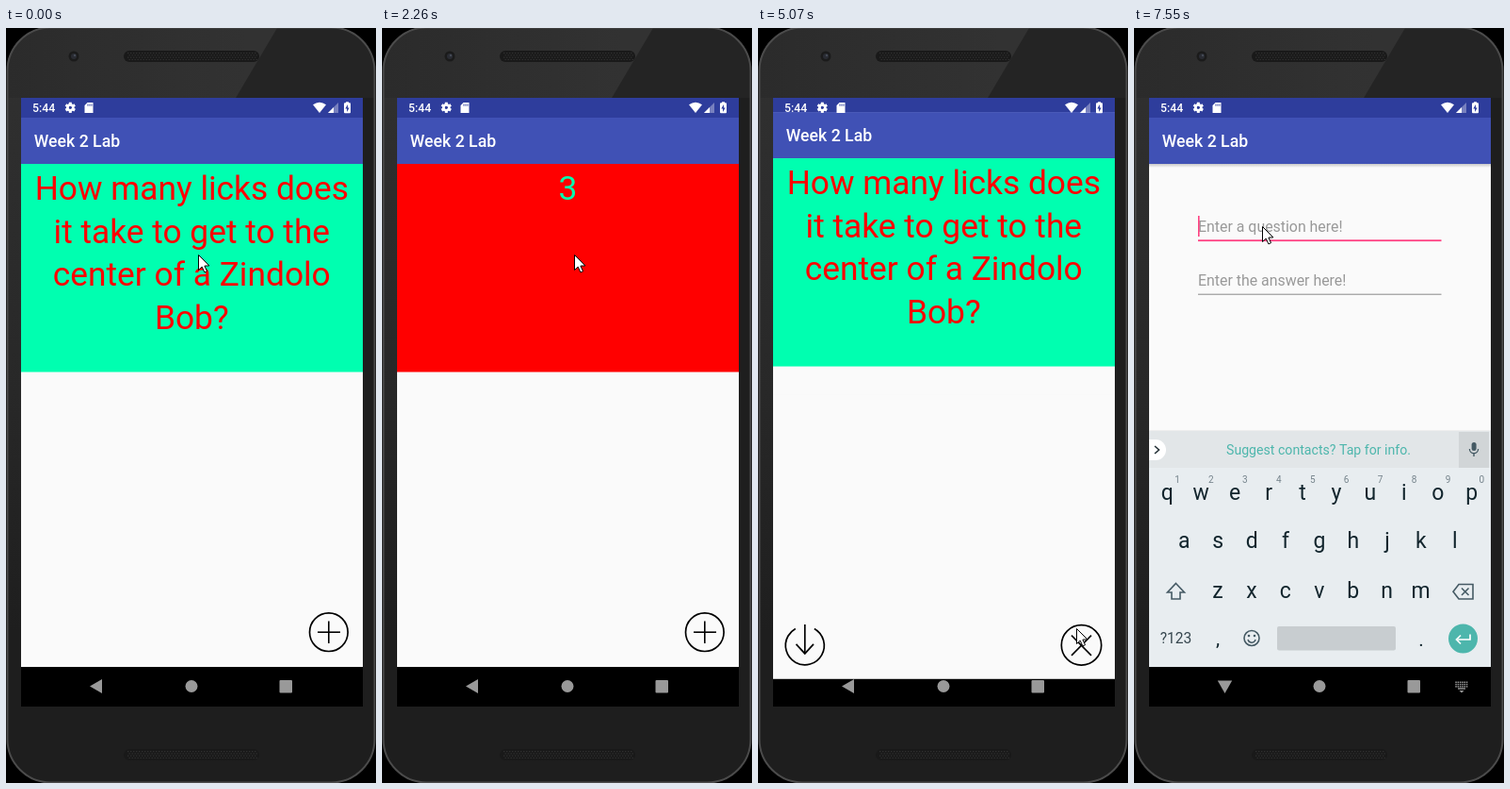
Write an HTML page with a canvas that moves like this. It is 393 by 800 pixels and loops after 8 s.

```html
<!DOCTYPE html>
<html lang="en">
<head>
<meta charset="utf-8">
<title>Flashcard app</title>
<style>
  html, body { margin: 0; width: 100%; height: 100%; overflow: hidden; background: #000; }
  canvas { display: block; width: 393px; height: 800px; }
</style>
</head>
<body>
<canvas id="stage"></canvas>
<script>
const W = 393, H = 800, LOOP = 8000;
const MINT = '#00ffb0', RED = '#ff0000', PAGE = '#fafafa', TEAL = '#4db6ac', PINK = '#ff4081';
const dpr = window.devicePixelRatio || 1;

function layer(canvas) {
  canvas.width = W * dpr;
  canvas.height = H * dpr;
  const ctx = canvas.getContext('2d');
  ctx.scale(dpr, dpr);
  return ctx;
}

const stage = layer(document.getElementById('stage'));
const phone = layer(document.createElement('canvas'));
const keys = layer(document.createElement('canvas'));
let g = stage;

// Drawing helpers
function rect(x, y, w, h, color) {
  g.fillStyle = color;
  g.fillRect(x, y, w, h);
}
function round(x, y, w, h, r, color) {
  g.fillStyle = color;
  g.beginPath();
  g.roundRect(x, y, w, h, r);
  g.fill();
}
function disc(x, y, r, color) {
  g.fillStyle = color;
  g.beginPath();
  g.arc(x, y, r, 0, Math.PI * 2);
  g.fill();
}
function ring(x, y, r, color, width, from = 0, to = Math.PI * 2) {
  g.strokeStyle = color;
  g.lineWidth = width;
  g.beginPath();
  g.arc(x, y, r, from, to);
  g.stroke();
}
function trace(points) {
  g.beginPath();
  for (let i = 0; i < points.length; i += 2) g.lineTo(points[i], points[i + 1]);
}
function poly(points, color) {
  trace(points);
  g.fillStyle = color;
  g.fill();
}
function line(points, color, width, closed) {
  trace(points);
  if (closed) g.closePath();
  g.strokeStyle = color;
  g.lineWidth = width;
  g.stroke();
}
function text(str, x, y, size, color, align = 'left', weight = 400) {
  g.font = `${weight} ${size}px Roboto, sans-serif`;
  g.textAlign = align;
  g.fillStyle = color;
  g.fillText(str, x, y);
}

// Timing helpers
const clamp = v => Math.min(1, Math.max(0, v));
const span = (t, a, b) => clamp((t - a) / (b - a));
const mix = (a, b, k) => a + (b - a) * k;
const smooth = k => k * k * (3 - 2 * k);
const easeOut = k => 1 - (1 - k) ** 2;

// cubic-bezier(0.2, 0, 0, 1)
function swift(x) {
  let lo = 0, hi = 1;
  for (let i = 0; i < 24; i++) {
    const s = (lo + hi) / 2;
    if (0.6 * s * (1 - s) ** 2 + s ** 3 < x) lo = s; else hi = s;
  }
  return lo * lo * (3 - 2 * lo);
}

function speaker(y) {
  round(125, y, 144, 12, 6, '#191919');
  for (let row = 0; row < 4; row++)
    for (let x = 129 + (row % 2) * 1.5; x < 266; x += 3)
      rect(x, y + 2 + row * 2.3, 1.4, 1.2, '#303030');
}

function drawPhone() {
  rect(0, 0, W, H, '#000');
  g.save();
  g.beginPath();
  g.roundRect(1, -1, 391, 801, 46);
  g.clip();
  rect(0, 0, W, H, '#1e1e1e');
  const side = g.createLinearGradient(0, 0, 0, 640);
  side.addColorStop(0, '#313131');
  side.addColorStop(0.6, '#282828');
  side.addColorStop(1, '#1e1e1e');
  rect(0, 0, 16, 640, side);
  const top = g.createLinearGradient(0, 0, W, 0);
  top.addColorStop(0, '#2b2b2b');
  top.addColorStop(0.65, '#323232');
  rect(0, 0, W, 74, '#242424');
  poly([0, 0, 288, 0, 244, 74, 0, 74], top);
  g.restore();
  g.strokeStyle = '#4b4b4b';
  g.lineWidth = 2;
  g.beginPath();
  g.roundRect(1.5, -0.5, 390, 800, 46);
  g.stroke();
  speaker(24);
  speaker(764);
  disc(72, 30, 5.5, '#1b1b1b');
  disc(72, 30, 3, '#2a2c33');
  disc(73, 29, 1.2, '#454a55');
}

function drawKeys() {
  const ink = '#12252d', soft = '#455a64';
  rect(16, 426, 363, 1, '#eeeeee');
  rect(16, 427, 363, 250, '#e8edf0');
  rect(16, 427, 363, 39, '#e2e6e8');
  rect(345, 428, 32, 38, '#d1d5d7');
  round(5, 436, 29, 22, 11, '#fff');
  line([22, 443, 26.5, 447, 22, 451], '#263238', 1.6);
  text('Suggest contacts? Tap for info.', 98, 452, 14.13, TEAL);
  round(358.6, 439, 5, 9, 2.5, soft);
  ring(361, 446, 4.6, soft, 1.3, 0, Math.PI);
  line([361, 450.5, 361, 454], soft, 1.4);

  [['qwertyuiop', 35.3, 500], ['asdfghjkl', 53.3, 551], ['zxcvbnm', 89, 604]].forEach(([row, x, y]) =>
    [...row].forEach((c, i) => text(c, x + i * 35.93, y, 23, ink, 'center')));
  [...'1234567890'].forEach((c, i) => text(c, 46 + i * 35.93, 482, 10, '#75838b', 'center'));

  line([44.5, 588.5, 53.5, 598, 49, 598, 49, 605, 40, 605, 40, 598, 35.5, 598], soft, 1.6, true);
  line([345, 589.5, 360, 589.5, 360, 605, 345, 605, 339, 597.2], soft, 1.6, true);
  line([348, 593.5, 355.5, 601], soft, 1.6);
  line([355.5, 593.5, 348, 601], soft, 1.6);

  text('?123', 44.5, 652, 15.6, '#37474f', 'center');
  text(',', 89, 654, 21, ink, 'center');
  text('.', 305, 655, 21, ink, 'center');
  ring(125, 646.5, 8, soft, 1.6);
  disc(122, 644, 1.3, soft);
  disc(128, 644, 1.3, soft);
  ring(125, 647, 4.2, soft, 1.5, 0.25, Math.PI - 0.25);
  round(152, 634, 126, 25.5, 2, '#c8cdd0');
  disc(349.5, 647, 15.5, TEAL);
  line([357, 642.5, 357, 648, 343.5, 648], '#fff', 1.7);
  line([347, 643.5, 342.5, 648, 347, 652.5], '#fff', 1.7);
}

function statusIcons() {
  text('5:44', 28, 89, 12.3, '#fff', 'left', 500);
  g.save();
  g.translate(68.3, 84.3);
  for (let i = 0; i < 6; i++) {
    g.rotate(Math.PI / 3);
    rect(-1.5, -5.6, 3, 4, '#fff');
  }
  g.restore();
  ring(68.3, 84.3, 3.1, '#fff', 2.4);
  poly([86.5, 79, 92.5, 79, 92.5, 90, 83.5, 90, 83.5, 82], '#fff');
  [86.5, 88.5, 90.5].forEach(x => rect(x, 80.5, 0.9, 2.2, '#303f9f'));
  g.beginPath();
  g.moveTo(333, 90);
  g.lineTo(326, 81.3);
  g.quadraticCurveTo(333, 76.2, 340, 81.3);
  g.fillStyle = '#fff';
  g.fill();
  poly([353, 79, 353, 90, 342, 90], 'rgba(255,255,255,.35)');
  poly([348, 84, 348, 90, 342, 90], '#fff');
  rect(361, 78.3, 3, 2, '#fff');
  round(359, 79.3, 7, 11, 1, '#fff');
  poly([363, 81, 360.3, 85.6, 362, 85.6, 362, 89, 364.7, 84.4, 363, 84.4], '#303f9f');
}

function navIcons(typing) {
  const c = 'rgba(255,255,255,.6)';
  poly(typing ? [88.8, 691.5, 104.2, 691.5, 96.5, 705] : [89, 697.5, 102, 690, 102, 705], c);
  disc(197, 697.5, 6.5, c);
  round(290.5, 691, 13.5, 13.5, 1, c);
  if (!typing) return;
  for (let row = 0; row < 3; row++)
    for (let i = 0; i < 6; i++) rect(341.3 + i * 2.3, 692.5 + row * 2.3, 1.5, 1.5, c);
  rect(344, 699.3, 8, 1.4, c);
  poly([345.5, 702, 350.5, 702, 348, 704.5], c);
}

function frame() {
  rect(16, 74, 363, 21, '#2e3d9c');
  rect(16, 95, 363, 582, PAGE);
  rect(16, 95, 363, 49, '#4051b5');
  text('Week 2 Lab', 29.8, 126, 17.66, '#fff', 'left', 500);
  rect(16, 677, 363, 42, '#000');
}

function cardPage(t) {
  const flipped = (t >= 990 && t < 1610) || (t >= 2260 && t < 2860);
  frame();
  rect(16, 144, 363, 220.5, flipped ? RED : MINT);
  const lines = flipped ? ['3'] : ['How many licks does', 'it take to get to the', 'center of a Zindolo', 'Bob?'];
  lines.forEach((s, i) => text(s, 197.3, 182 + i * 45.6, 35.32, flipped ? MINT : RED, 'center'));
  ring(342.8, 640.2, 20.3, '#000', 1.7);
  line([331, 640.2, 355, 640.2], '#000', 1.6);
  line([342.8, 628.5, 342.8, 652], '#000', 1.6);
}

function formPage(t) {
  const focused = t >= 6370;
  frame();
  const shade = g.createLinearGradient(0, 144, 0, 148);
  shade.addColorStop(0, 'rgba(0,0,0,.2)');
  shade.addColorStop(1, 'rgba(0,0,0,0)');
  rect(16, 144, 363, 4, shade);
  text('Enter a question here!', 68, 216, 15.9, '#999');
  text('Enter the answer here!', 68, 273.3, 15.9, '#999');
  if (focused) rect(68, 224.3, 258.5, 1.8, PINK);
  else rect(68, 224, 258.5, 1, '#8b8b8b');
  rect(68, 281.6, 258.5, 1.3, '#a3a3a3');
  if (focused && (t < 7050 || t >= 7550)) rect(68, 199, 1.6, 22, PINK);

  ring(49.8, 641.4, 20.5, '#000', 1.7, -1.06, Math.PI + 1.06);
  line([49.8, 619, 49.8, 650], '#000', 1.7);
  line([40.5, 640, 49.8, 650, 59, 640], '#000', 1.7);
  ring(343.5, 641, 21.2, '#000', 1.7);
  line([333, 630.8, 354, 652], '#000', 1.6);
  line([354, 630.8, 333, 652], '#000', 1.6);
}

function screen(t) {
  const e = swift(span(t, 4985, 5400));
  if (e < 1) {
    g.save();
    g.translate(0, -11.6 * e);
    cardPage(t);
    g.restore();
  }
  if (e > 0) {
    g.save();
    g.translate(0, 26.4 * (1 - e));
    g.beginPath();
    g.rect(16, 74 + 618 * (1 - e), 363, 645);
    g.clip();
    formPage(t);
    g.restore();
  }
  const typing = t >= 6980;
  if (typing) {
    g.globalAlpha = mix(0.5, 1, span(t, 6980, 7075));
    g.drawImage(keys.canvas, 0, 62 * (1 - easeOut(span(t, 6980, 7120))), W, H);
    g.globalAlpha = 1;
  }
  statusIcons();
  navIcons(typing);
}

// Pointer legs: start, end, target x, target y
const legs = [[3110, 3930, 335.5, 630], [3930, 4010, 337.8, 635.5], [5460, 5810, 161.5, 230], [5840, 6050, 135.8, 209.5]];

function pointer(t) {
  let x = 203.5, y = 239.5;
  for (const [a, b, tx, ty] of legs) {
    const k = smooth(span(t, a, b));
    x = mix(x, tx, k);
    y = mix(y, ty, k);
  }
  g.save();
  g.translate(Math.round(x) + 0.5, Math.round(y) + 0.5);
  const arrow = [0, 0, 0, 16, 3.7, 12.6, 6.4, 18.4, 9, 17.2, 6.4, 11.6, 11.4, 11.4];
  poly(arrow, '#fff');
  line(arrow, '#000', 1, true);
  g.restore();
}

function draw(now) {
  const t = now % LOOP;
  g = stage;
  g.drawImage(phone.canvas, 0, 0, W, H);
  g.save();
  g.beginPath();
  g.rect(16, 74, 363, 645);
  g.clip();
  rect(16, 74, 363, 645, '#000');
  screen(t);
  g.restore();
  pointer(t);
}

g = phone;
drawPhone();
g = keys;
drawKeys();

let start;
function tick(now) {
  start ??= now;
  draw(now - start);
  requestAnimationFrame(tick);
}
draw(0);
requestAnimationFrame(tick);
</script>
</body>
</html>
```
